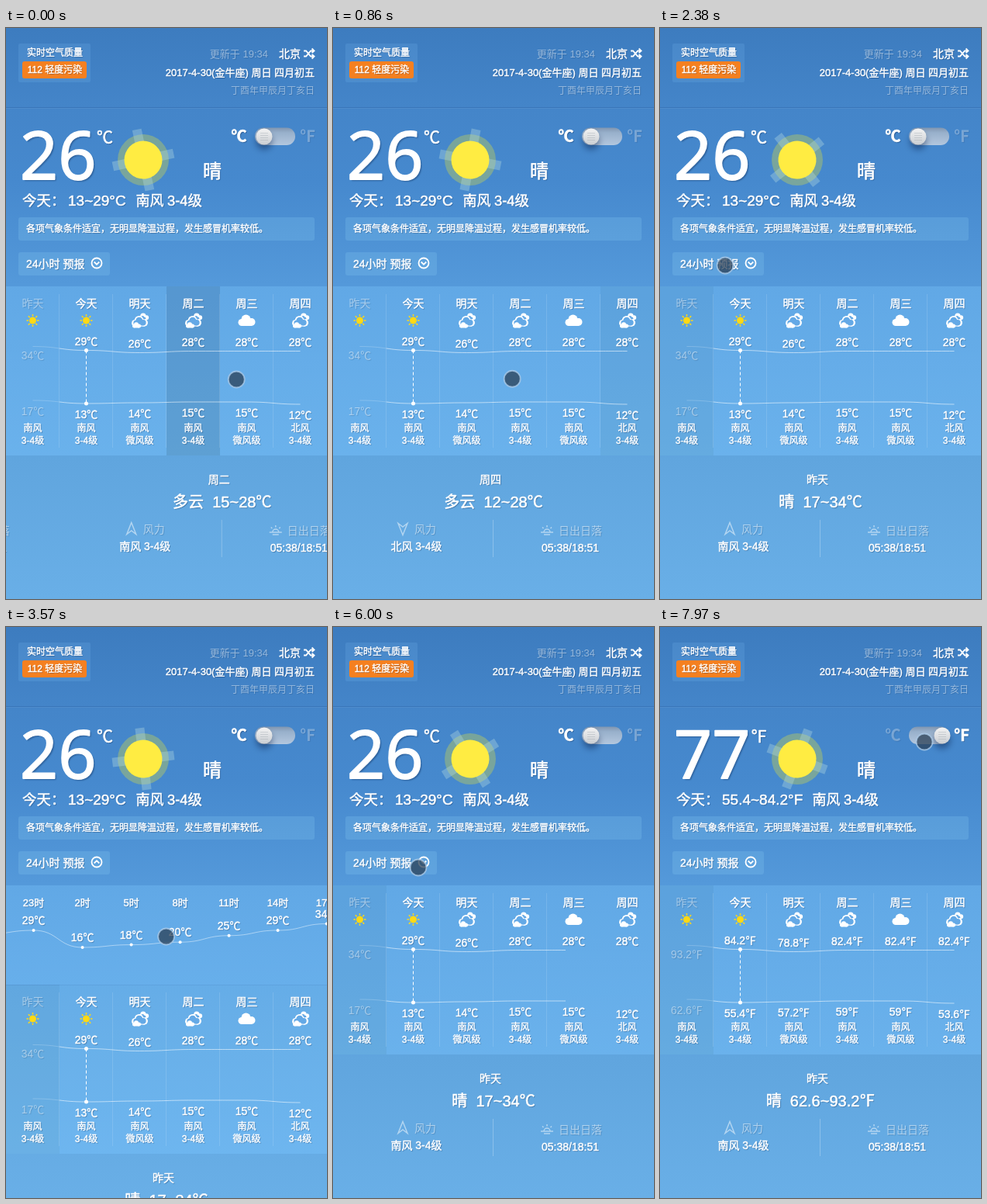
These frames come from a looping animation (414 by 736 pixels, 8000 ms). An HTML page with a canvas:

```html
<!DOCTYPE html>
<html lang="zh-CN">
<head>
<meta charset="utf-8">
<style>
html, body { margin: 0; width: 100%; height: 100%; overflow: hidden; background: #5499da; }
canvas { display: block; }
</style>
</head>
<body>
<canvas id="stage" width="414" height="736"></canvas>
<script>
const c = document.getElementById('stage').getContext('2d');
const W = 414, H = 736, LOOP = 8000, COL = 69;
const CJK = '"Noto Sans CJK SC", "Noto Sans CJK", sans-serif';
const SANS = '"Liberation Sans", ' + CJK;
const WHITE = '#fff', DIM = 'rgba(255,255,255,.45)', FAINT = 'rgba(255,255,255,.3)';

const EXPAND = 2430, COLLAPSE = 4980, REDRAW = 4960, TOGGLE = 7720;
const DRAG_FROM = 3350, DRAG_TO = 4500, DRAG_X = 265.5;
const RIPPLE_SPEED = .54, SLIDE_DELAY = 62, SLIDE_TIME = 300;

// name, sky, low, high, wind, force
const DAYS = [
  ['昨天', '晴', 17, 34, '南风', '3-4级'],
  ['今天', '晴', 13, 29, '南风', '3-4级'],
  ['明天', '多云', 14, 26, '南风', '微风级'],
  ['周二', '多云', 15, 28, '南风', '3-4级'],
  ['周三', '阴', 15, 28, '南风', '微风级'],
  ['周四', '多云', 12, 28, '北风', '3-4级']
].map(([name, sky, low, high, wind, force]) => ({ name, sky, low, high, wind, force }));
const HOURS = [26, 29, 16, 18, 20, 25, 29, 34, 31];

const TAPS = [
  { at: -279, day: 3, x: 241, y: 453 },
  { at: 85, day: 4, x: 310, y: 453 },
  { at: 415, day: 5, x: 372, y: 454 },
  { at: 1235, day: 0, x: 47, y: 450 }
];
// time, x, y
const POINTER = [
  [0, 297, 453], [60, 310, 453], [240, 310, 453], [380, 372, 454], [640, 372, 454],
  [1150, 47, 450], [1520, 47, 450], [2150, 84, 306], [2600, 84, 306], [3200, 265.5, 402],
  [3350, 265.5, 402], [3570, 207, 399], [3800, 113, 404], [4150, 113, 404], [4500, 265.5, 404],
  [4850, 110, 310], [6050, 110, 310], [6620, 357, 146], [7500, 341, 148], [8000, 341, 148]
];

const clamp = (v, lo = 0, hi = 1) => Math.min(hi, Math.max(lo, v));
const swing = u => .5 - Math.cos(Math.PI * clamp(u)) / 2;
const quadOut = u => 1 - (1 - clamp(u)) ** 2;
const colX = i => 34.5 + COL * i;

function gradient(y0, y1, ...stops) {
  const g = c.createLinearGradient(0, y0, 0, y1);
  stops.forEach(([p, color]) => g.addColorStop(p, color));
  return g;
}

// y is the vertical middle of the glyphs; a thin stroke thickens them
function text(str, x, y, size, { align = 'center', color = WHITE, font = SANS, weight = 400, shadow = 1 } = {}) {
  c.save();
  c.font = `${weight} ${size}px ${font}`;
  c.textAlign = align;
  c.fillStyle = c.strokeStyle = color;
  c.lineWidth = .15 + size * .02;
  c.lineJoin = 'round';
  const base = Math.round(y + size * .365);
  c.shadowColor = 'rgba(0,20,60,.35)';
  c.shadowOffsetX = c.shadowOffsetY = shadow;
  c.shadowBlur = shadow;
  c.fillText(str, x, base);
  c.shadowColor = 'transparent';
  if (color === WHITE) c.strokeText(str, x, base);
  c.restore();
}

function box(x, y, w, h, r, fill) {
  c.beginPath();
  c.roundRect(x, y, w, h, r);
  c.fillStyle = fill;
  c.fill();
}

function disc(x, y, r, fill) {
  c.beginPath();
  c.arc(x, y, r, 0, 7);
  c.fillStyle = fill;
  c.fill();
}

function outline(d, x, y, color, width = 1.5, flip = 1) {
  c.save();
  c.translate(x, y);
  c.scale(1, flip);
  c.strokeStyle = color;
  c.lineWidth = width;
  c.stroke(new Path2D(d));
  c.restore();
}

function curve(points, stroke) {
  c.beginPath();
  points.forEach(([x, y], i) => {
    if (!i) return c.moveTo(x, y);
    const [px, py] = points[i - 1], mid = (px + x) / 2;
    c.bezierCurveTo(mid, py, mid, y, x, y);
  });
  c.strokeStyle = stroke;
  c.lineWidth = 1;
  c.stroke();
}

function clipped(x, y, w, h, draw) {
  c.save();
  c.beginPath();
  c.rect(x, y, w, h);
  c.clip();
  draw();
  c.restore();
}

function cloud(x, y, s, fill) {
  c.save();
  c.translate(x, y);
  c.scale(s, s);
  disc(-6.5, 2.5, 4.5, fill);
  disc(-1, -1.5, 6, fill);
  disc(6, 2, 5, fill);
  c.fillRect(-6.5, 0, 13, 7);
  c.restore();
}

function skyIcon(sky, x, y) {
  if (sky === '阴') return cloud(x, y, 1, WHITE);
  if (sky === '多云') {
    cloud(x + 5, y - 5, .6, WHITE);
    cloud(x + 4, y - 3.5, .34, '#64a9e6');
    cloud(x, y + 1, .95, WHITE);
    cloud(x, y + 1.2, .74, '#64a9e6');
    return cloud(x - 4, y + 6, .5, WHITE);
  }
  disc(x, y, 4.5, '#ffd914');
  c.strokeStyle = '#ffd914';
  c.lineWidth = 1.5;
  c.beginPath();
  for (let a = 0; a < 8; a++) {
    const cos = Math.cos(a * Math.PI / 4), sin = Math.sin(a * Math.PI / 4);
    c.moveTo(x + cos * 5.5, y + sin * 5.5);
    c.lineTo(x + cos * 8, y + sin * 8);
  }
  c.stroke();
}

function background() {
  c.fillStyle = gradient(0, H, [0, '#3d7cbf'], [.14, '#4485c9'], [.27, '#4689ce'],
    [.45, '#5499da'], [.75, '#60a5de'], [1, '#69afe7']);
  c.fillRect(0, 0, W, H);
  c.fillStyle = 'rgba(20,60,130,.22)';
  c.fillRect(0, 102, W, 1);
  c.fillStyle = 'rgba(255,255,255,.06)';
  c.fillRect(0, 103, W, 1);
}

function header() {
  box(16, 20, 93, 50, 2, 'rgba(120,190,240,.18)');
  text('实时空气质量', 63, 32, 12);
  box(21, 43, 83, 22, 3, '#f58020');
  text('112 轻度污染', 63, 54, 12);
  text('更新于 19:34', 338, 33, 13, { align: 'right', color: DIM });
  text('北京', 380, 33, 14, { align: 'right' });
  outline('M-7-3.5H-4L2 3.5H6M-7 3.5H-4L2-3.5H6M3.5-6.5L6.5-3.5L3.5-.8M3.5.8L6.5 3.5L3.5 6.5', 391, 33, WHITE, 1.8);
  text('2017-4-30(金牛座) 周日 四月初五', 398, 57, 13, { align: 'right' });
  text('丁酉年甲辰月丁亥日', 398, 81, 12, { align: 'right', color: DIM });
}

function sun(t) {
  c.save();
  c.translate(177, 170);
  disc(0, 0, 33, 'rgba(190,205,90,.42)');
  c.rotate((-12 + t * .0267) * Math.PI / 180);
  c.fillStyle = 'rgba(180,220,225,.36)';
  for (let i = 0; i < 4; i++) {
    c.fillRect(-6, -40, 12, 18);
    c.rotate(Math.PI / 2);
  }
  disc(0, 0, 24.5, '#ffec42');
  c.restore();
}

function unitSwitch(t, fahrenheit) {
  text('℃', 300.5, 140, 20, { weight: 700, font: CJK, color: fahrenheit ? FAINT : WHITE });
  text('℉', 389, 140, 20, { weight: 700, font: CJK, color: fahrenheit ? WHITE : FAINT });
  box(321, 128.5, 52, 22.5, 11, gradient(128, 151, [0, '#7f94ae'], [.3, '#98b0cb'], [1, '#b3c7de']));
  const x = 333 + 31 * swing((t - TOGGLE) / 180);
  c.save();
  c.shadowColor = 'rgba(0,20,60,.45)';
  c.shadowOffsetY = 6;
  c.shadowBlur = 8;
  disc(x, 140, 10.5, gradient(129, 151, [0, '#f4f4f4'], [1, '#c9cdd2']));
  c.restore();
  c.fillStyle = 'rgba(120,130,140,.25)';
  for (let y = 135; y <= 145; y += 3) c.fillRect(x - 5, y, 10, 1);
}

function current(t, fahrenheit, open) {
  text(fahrenheit ? '77' : '26', 18, 164, 86, { align: 'left', font: '"Open Sans", "Noto Sans", sans-serif', shadow: 2 });
  text(fahrenheit ? '℉' : '℃', 127.5, 140, 21, { font: CJK });
  sun(t);
  text('晴', 266, 184, 24);
  unitSwitch(t, fahrenheit);
  const left = { align: 'left' }, shift = fahrenheit ? 29 : 0;
  text('今天：', 21, 222, 18.5, left);
  text(fahrenheit ? '55.4~84.2°F' : '13~29°C', 80, 222, 19, left);
  text('南风', 167.5 + shift, 222, 18, left);
  text('3-4级', 208 + shift, 222, 18.4, left);

  box(16, 244, 382, 30, 3, 'rgba(130,200,240,.25)');
  text('各项气象条件适宜，无明显降温过程，发生感冒机率较低。', 26, 259, 12, left);
  box(16, 289, 118, 30, 3, 'rgba(130,200,240,.25)');
  text('24小时 预报', 26, 304, 14, left);
  outline('M6.5 0A6.5 6.5 0 1 1-6.5 0A6.5 6.5 0 1 1 6.5 0M-3.3-1.5L0 1.8L3.3-1.5', 117, 303, WHITE, 1.8, open ? -1 : 1);
}

const panelFill = (y0, y1) => gradient(y0, y1, [0, 'rgba(120,195,250,.36)'], [1, 'rgba(120,195,255,.42)']);

function hourly(t, scroll) {
  c.fillStyle = panelFill(333, 461);
  c.fillRect(0, 333, W, 128);
  c.fillStyle = 'rgba(30,80,150,.18)';
  c.fillRect(0, 461, W, 1);
  const points = HOURS.map((temp, i) => [31.5 + 63 * i + scroll, 391 + (29 - temp) * 1.69]);
  const reach = 63 * (HOURS.length - 1) * quadOut((t - EXPAND) / 1000);
  clipped(0, 333, points[0][0] + reach + 3, 128, () => {
    curve(points, DIM);
    points.forEach(([x, y]) => disc(x, y, 2, WHITE));
  });
  points.forEach(([x, y], i) => {
    text((20 + i * 3) % 24 + '时', x, 355, 13);
    text(HOURS[i] + '℃', x, y - 13, 14);
  });
}

function daily(t, selected, tap, degrees) {
  const fill = panelFill(333, 551);
  DAYS.forEach((_, i) => {
    c.fillStyle = i === selected ? 'rgba(120,190,230,.22)' : fill;
    c.fillRect(i * COL, 333, COL, 218);
  });

  const age = t - tap.at;
  if (age < 360) {
    clipped(tap.day * COL, 333, COL, 218, () =>
      disc(tap.x, tap.y, age * RIPPLE_SPEED, `rgba(30,50,75,${.24 * clamp((360 - age) / 210)})`));
  }

  const drawn = t < REDRAW ? W : 35 + 344 * quadOut((t - REDRAW) / 2000);
  clipped(0, 333, drawn >= 379 ? W : drawn, 218, () => {
    c.fillStyle = 'rgba(255,255,255,.13)';
    for (let i = 1; i < 6; i++) c.fillRect(i * COL - 1, 343, 1, 198);
    const ink = c.createLinearGradient(0, 0, W, 0);
    [[0, .2], [COL / W, .2], [COL / W, .55], [1, .55]].forEach(([p, a]) => ink.addColorStop(p, `rgba(255,255,255,${a})`));
    curve(DAYS.map((d, i) => [colX(i), 444.5 - d.high]), ink);
    curve(DAYS.map((d, i) => [colX(i), 497 - d.low]), ink);
    c.setLineDash([4, 3]);
    c.strokeStyle = WHITE;
    c.beginPath();
    c.moveTo(103.5, 415.5);
    c.lineTo(103.5, 484);
    c.stroke();
    c.setLineDash([]);
    disc(103.5, 415.5, 2.5, WHITE);
    disc(103.5, 484, 2.5, WHITE);
  });

  DAYS.forEach((d, i) => {
    const x = colX(i), color = i ? WHITE : DIM;
    text(d.name, x, 355, 14, { color });
    skyIcon(d.sky, x, 377);
    text(degrees(d.high), x, 444.5 - d.high + (i ? -11.5 : 11.5), 14, { color });
    text(degrees(d.low), x, 511 - d.low, 14, { color });
    text(d.wind, x, 516, 12);
    text(d.force, x, 532, 12);
  });
}

function detail(day, offset, degrees) {
  const d = DAYS[day], soft = 'rgba(255,255,255,.5)';
  c.save();
  c.translate(offset, 0);
  text(d.name, 203, 582, 14);
  text(`${d.sky}  ${degrees(d.low).slice(0, -1)}~${degrees(d.high)}`, 207, 611, 20);
  outline('M0-8L6 7L0 2.5L-6 7Z', 90, 645.5, soft, 1.5, d.wind === '北风' ? -1 : 1);
  text('风力', 119, 646, 14, { color: soft });
  text(`${d.wind} ${d.force}`, 107.5, 668, 14);
  c.fillStyle = 'rgba(255,255,255,.25)';
  c.fillRect(206, 634, 1, 48);
  outline('M-8 3H8M-4 3A4 4 0 0 1 4 3M0-6V-3.5M-6-3.5L-4.5-2M6-3.5L4.5-2M-4 6H4', 276, 647, soft);
  text('日出日落', 319, 648, 14, { color: soft });
  text('05:38/18:51', 306, 670, 14);
  c.restore();
}

function pointerAt(t) {
  const i = Math.max(1, POINTER.findIndex(p => p[0] >= t));
  const [t0, x0, y0] = POINTER[i - 1], [t1, x1, y1] = POINTER[i];
  const u = (t - t0) / (t1 - t0);
  return [x0 + (x1 - x0) * u, y0 + (y1 - y0) * u];
}

function pointer(x, y, pressed) {
  disc(x, y, 10.5, `rgba(42,62,84,${pressed ? .88 : .74})`);
  c.strokeStyle = 'rgba(175,205,235,.75)';
  c.lineWidth = 1.8;
  c.stroke();
}

function render(t) {
  const fahrenheit = t >= TOGGLE, open = t >= EXPAND && t < COLLAPSE;
  const degrees = n => fahrenheit ? +(n * 1.8 + 32).toFixed(1) + '℉' : n + '℃';
  const [px, py] = pointerAt(t);
  const tap = TAPS.findLast(p => t >= p.at);
  const index = TAPS.findLastIndex(p => t >= p.at + SLIDE_DELAY);
  const { day, at } = TAPS[index], before = index ? TAPS[index - 1].day : 1;

  background();
  header();
  current(t, fahrenheit, open);
  if (open) hourly(t, t > DRAG_FROM && t < DRAG_TO ? clamp(px - DRAG_X, -153, 0) : 0);

  c.save();
  if (open) c.translate(0, 128);
  daily(t, day, tap, degrees);
  const slide = swing((t - at - SLIDE_DELAY) / SLIDE_TIME), side = Math.sign(day - before) * W;
  if (slide < 1) detail(before, -side * slide, degrees);
  detail(day, side * (1 - slide), degrees);
  c.restore();

  pointer(px, py, t - tap.at < 160);
}

const start = performance.now();
function tick() {
  render((performance.now() - start) % LOOP);
  requestAnimationFrame(tick);
}
tick();
</script>
</body>
</html>
```
